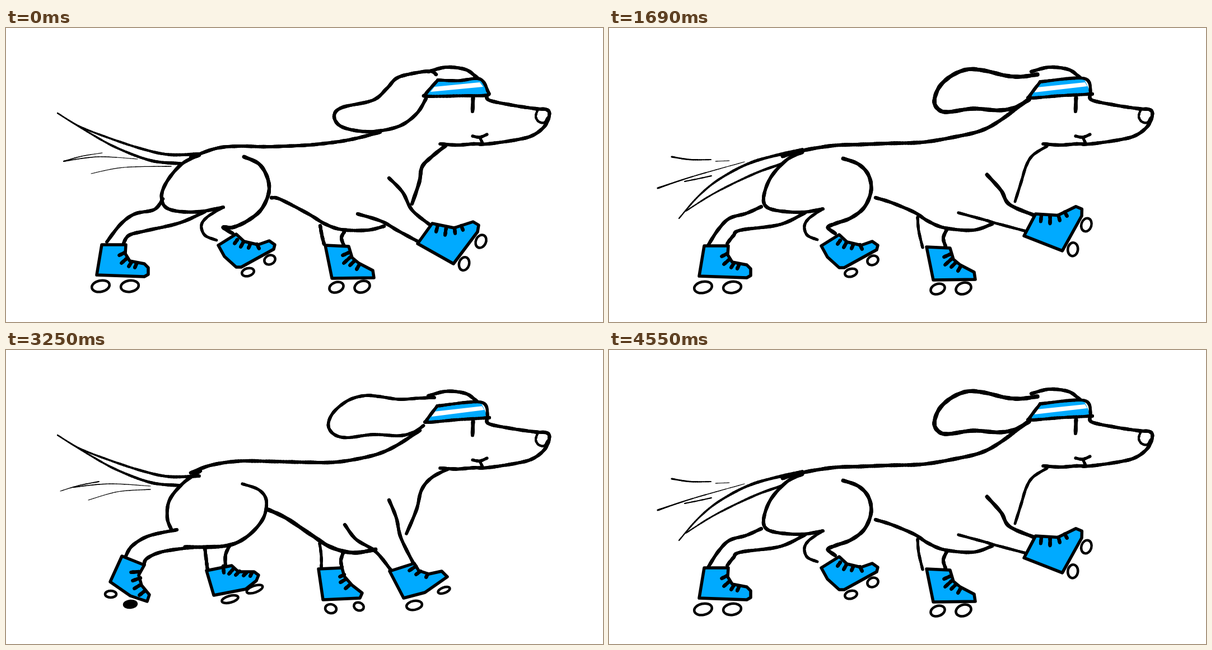
These frames come from a looping animation (1066 px wide and 525 px high, 4680 ms). An HTML page with a canvas:

```html
<!DOCTYPE html>
<html lang="en">
<head>
<meta charset="utf-8">
<title>Skating dachshund</title>
<style>
html, body { margin: 0; width: 100%; height: 100%; overflow: hidden; background: #fff; }
canvas { display: block; }
</style>
</head>
<body>
<canvas id="stage" width="1066" height="525"></canvas>
<script>
const ctx = document.getElementById('stage').getContext('2d');
const BLUE = '#00aaff', STEP = 130, LOOP = 4680, CYCLE = 11;

// Strokes read "width x y x y ..."; a width such as "2-6" swells along the line.
const ears = {
  low: '6 768 83 757 77 722 82 697 90 680 108 655 129 600 142 586 157 597 175 630 184 665 184 705 174 734 152 750 126',
  up: '7 765 83 735 87 708 85 670 76 640 74 612 85 590 105 581 130 588 145 605 150 650 144 695 147 725 142 750 128',
  flat: '4 765 87 740 85 695 91 662 90 640 89 610 95 580 117 570 137 582 155 612 163 660 158 710 159 732 151 741 142',
  mid: '5.5 768 86 745 86 720 90 690 100 660 112 610 116 588 125 577 145 586 162 610 171 650 174 688 173 718 161 755 125'
};

const backs = {
  low: '6 330 231 375 215 415 211 460 212 500 211 540 209 570 206 600 202 630 196 668 186',
  up: '6.5 310 229 345 219 400 210 450 208 500 206 560 204 620 194 665 183 700 164 748 128',
  flat: '6 350 210 385 193 430 187 500 190 570 195 610 197 640 194 670 186 700 174 730 159',
  flat2: '6 355 207 385 196 430 189 480 190 520 191 600 188 660 182 685 173 703 165 722 156',
  mid: '6.5 330 220 360 210 420 203 470 200 520 200 575 201 605 198 630 193 660 184 690 173'
};

const tails = {
  up: ['2-6 92 152 130 175 180 195 240 215 290 226 345 225', '2-6 92 152 150 188 200 215 260 237 312 242'],
  mid: ['4-6 79 235 120 241 200 238 260 233 300 225 352 208', '4-6 79 235 130 247 185 249 240 249 316 237'],
  down: ['2-6 125 340 160 300 200 268 260 238 345 217', '2-5 137 327 190 294 260 260 310 242']
};

const winds = {
  up: ['2-1 103 238 135 229 172 223', '2-1 103 238 165 230 235 234', '1-1.5 152 260 210 249 295 247'],
  up2: ['1-2 97 252 130 242 166 235', '2-1 120 245 185 239 258 243', '1-1.5 147 268 200 253 258 249'],
  mid: ['2-1 179 176 205 188 236 199', '2-.5 109 191 150 205 225 215', '2-1 125 200 200 217 290 223'],
  mid2: ['3-1 98 189 130 203 167 214', '2-1 98 189 180 208 275 223', '1-1.5 150 176 200 198 268 210'],
  down: ['3-2 112 230 145 235 182 235', '1 190 238 215 237', '3-1 87 286 150 265 242 239', '2 135 274 160 269 183 264'],
  down2: ['1.5 107 236 160 238 220 234', '1-2 132 266 190 256 250 240', '1.5 92 268 140 266 187 263']
};

const bands = {
  level: ['771 93 808 94 846 91 860 112 858 120 815 121 752 122 750 117', '765 105 846 97 852 105 758 114'],
  slant: ['770 96 848 90 860 115 858 118 805 121 753 125 752 120', '764 106 850 97 854 104 760 115']
};

const face = [
  '6 754 78 786 70 820 74 838 86 846 93',
  '6 859 119 863 129 905 138 945 144 966 146 970 156 962 175 942 191 915 199 860 207 835 207 805 209 775 207',
  '4 949 147 946 158 951 167 961 169 967 160',
  '6.5 834 124 833 149',
  '5 833 193 846 195 859 190',
  '5 846 195 851 206'
];

// Each skate: outline; laces; wheels as x y rx ry tilt (a sixth value fills the wheel).
const skates = {
  P: ['171 387 214 387 213 403 221 416 247 421 254 428 254 440 247 444 162 441',
    ['212 401 202 406', '215 412 206 420', '224 418 219 426', '233 421 230 428'], ['169 461 16 10 -12', '221 461 16 10 -8']],
  R: ['379 388 411 368 425 381 450 387 470 380 480 387 478 395 420 427 411 427 390 408',
    ['413 378 408 385', '424 382 419 391', '436 386 433 393', '448 386 452 394'], ['432 436 11 7 -15', '471 414 10 8 -25']],
  F: ['570 388 612 390 618 410 630 420 655 433 657 446 582 447',
    ['612 401 601 406', '615 409 603 420', '622 416 614 424', '630 424 626 431'], ['590 463 13 9 -20', '636 462 14 10 -20']],
  U: ['761 349 800 357 834 346 844 352 842 364 799 421 735 385',
    ['771 352 768 364', '786 357 784 370', '801 357 802 367', '813 353 816 361'], ['818 421 9 12 15', '848 381 9 12 25']],
  S: ['180 387 232 387 232 403 240 414 256 421 259 433 257 445 170 445',
    ['230 399 217 403', '232 408 216 412', '238 414 227 422', '243 418 240 426'], ['185 459 16 9 -8', '239 459 16 8 -8']],
  T: ['323 385 365 381 373 391 408 393 412 402 406 420 320 431 317 425',
    ['365 382 350 390', '372 391 367 399', '382 394 379 401', '392 395 392 402'], ['330 440 12 4 -8', '380 437 9 4 -5 1']],
  G: ['589 395 641 394 648 413 665 426 684 440 684 447 608 450 598 430',
    ['642 405 630 410', '646 414 636 422', '656 424 649 431', '667 430 662 437'], ['618 466 10 10 0', '668 466 12 11 0']],
  V: ['665 399 709 385 717 398 735 404 758 399 768 409 728 437 690 447',
    ['712 390 700 398', '720 399 712 405', '733 404 730 410'], ['709 460 14 8 -10', '762 433 11 5 -20']],
  K: ['250 368 290 384 280 402 285 420 299 437 295 449 265 439 229 414',
    ['280 396 266 397', '283 407 269 412', '282 420 272 426', '291 430 281 438'], ['230 436 10 6 0', '265 454 11 6 -5 1']],
  Q: ['315 400 360 391 372 402 400 402 408 408 404 418 385 433 328 444',
    ['345 392 346 404', '362 398 355 406', '374 401 367 408', '386 404 381 409', '396 404 393 410'], ['357 451 15 6 -15', '401 433 15 6 -20']],
  N: ['582 396 620 394 631 402 634 420 662 434 666 442 660 450 587 452',
    ['630 405 616 409', '633 414 621 420', '640 422 632 430', '652 429 647 437'], ['602 466 9 8 10', '652 463 9 8 10']],
  M: ['622 388 645 392 634 410 610 430 582 424 580 402', [], ['572 439 10 8 10']],
  D: ['558 391 600 389 604 404 618 420 636 434 632 443 566 446',
    ['604 401 596 405', '607 409 597 415', '613 420 606 426'], ['580 462 10 8 10', '630 458 9 7 20']],
  E: ['638 376 678 400 664 414 668 432 680 445 678 459 655 456 610 425',
    ['662 408 650 410', '664 418 652 422', '667 430 656 436', '674 437 667 444'], ['607 440 9 6 10', '648 464 12 6 5']]
};

// Leg poses: body and leg lines, then skates as "name dx dy turn", far ones first.
const nearOut = {
  lines: ['6 345 227 315 242 290 270 278 297 283 318 305 327 345 328 388 320',
    '6.5 425 230 452 243 467 268 469 295 455 325 430 345 405 356 388 356 405 367',
    '5 386 321 360 337 349 352 355 370 376 379', '6 280 305 265 324 230 332 205 350 180 382',
    '6 355 328 310 348 250 362 220 370 210 384', '6 474 303 490 306 540 332 570 350 600 360 645 361 675 354',
    '6.5 785 210 760 230 743 248 738 275 725 314', '6 684 268 708 293 725 325 755 350',
    '6 628 332 670 345 700 362 737 382', '6 561 353 564 370 568 386', '6 604 364 599 375 604 390'],
  skates: ['P 0 0 0', 'F 0 0 0', 'R 0 0 0', 'U 0 0 0']
};
const nearHigh = {
  lines: ['6 345 222 318 235 290 265 277 297 279 317 300 326 345 329 382 323',
    '6.5 418 233 445 243 463 262 468 290 456 320 432 339 405 349 391 356 404 367',
    '5 380 324 357 340 349 354 354 370 372 378', '6 272 319 245 331 215 340 195 360 177 388',
    '6 350 330 305 351 235 361 222 371 211 385', '6 476 303 505 312 545 329 570 345 600 357 650 361 684 350',
    '5 782 211 757 227 745 246 736 275 725 310', '6.5 675 262 700 290 715 315 758 334',
    '5 624 330 672 343 685 347 745 363', '5 551 338 553 362 560 392', '6 603 360 597 375 601 390'],
  skates: ['P -1 2 0', 'F -3 3 0', 'R 0 1 0', 'U 3 -23 -8']
};

const farBody = ['6.5 345 228 305 248 285 280 281 325', '6 287 327 245 333 222 350 203 384',
  '3-7 444 264 425 287 395 318 360 340 320 356 260 370 235 384', '6 420 293 460 298 500 311 545 338 580 358 596 360',
  '6 445 298 425 330 400 346 366 355 382 364', '6 326 355 332 369 355 377',
  '7 785 210 760 230 743 248 738 290 720 325 690 350 640 361', '6 598 280 590 305 595 335 598 360 604 390',
  '6 684 278 670 310 648 338 636 356 634 372 638 388'];
const farOut = {
  lines: [...farBody, '6 710 333 722 342 737 347', '6 675 357 695 369 715 378'],
  skates: ['R -24 -1 0', 'U -21 -6 0', 'P 24 1 0', 'F 33 1 0']
};
const farHigh = {
  lines: [...farBody, '6 712 322 722 328 740 332', '6 675 353 695 358 722 365'],
  skates: ['R -24 2 0', 'U -18 -29 -8', 'P 23 3 0', 'F 30 4 0']
};

const hipFlat = '6 352 209 318 237 301 265 301 295 316 320';
const hindFlat = [hipFlat, '5 332 320 290 328 265 342 258 367', '6 300 351 288 358 284 380', '5 316 355 317 398'];
const nearDown = {
  lines: [...hindFlat, '4-7 425 246 450 254 461 270 450 300 420 330 380 346 300 352', '7 375 350 350 364 345 400',
    '8 458 267 480 273 530 316 587 357', '4-5 602 283 592 310 589 350 588 392',
    '3-6 694 268 685 295 660 330 634 360 618 392', '6.5 800 214 770 222 745 243 727 270 722 300 710 328 680 347 635 360',
    '6 669 357 662 378 640 394'],
  skates: ['K 0 0 0', 'M 0 0 0', 'Q 0 0 0', 'N 0 0 0']
};
const farDown = {
  lines: [...hindFlat, '4-7 444 252 443 275 425 305 390 335 350 357', '6 350 353 325 355 300 351', '6 350 357 346 380 346 400',
    '7 442 278 490 289 530 322 570 350 605 366 640 368 668 352', '6 795 215 760 230 742 252 730 290 718 325 706 337',
    '5-7 600 291 615 318 640 342 670 350', '4-6 682 269 700 300 706 340 700 375 680 393',
    '4 567 356 565 388', '6 606 361 597 388'],
  skates: ['K 0 0 0', 'Q 0 0 0', 'D 0 0 0', 'E 0 0 0']
};
const farSwing = {
  lines: ['6.5 345 216 315 238 290 270 275 300 272 325', '6 272 321 235 338 205 360 188 382',
    '7 435 265 405 295 370 327 320 345 260 362 222 382', '7 412 283 460 291 510 303 550 328 588 350',
    '6 443 295 420 322 395 337 355 347', '7 355 347 372 370', '6 308 350 310 366 338 379',
    '6 598 288 588 315 592 350 597 392', '5-6 685 283 680 310 660 340 634 357 631 390',
    '6.5 787 212 755 235 740 262 728 302 712 333 680 352 640 360', '6 650 365 668 392', '7 684 348 697 382'],
  skates: ['T 0 0 0', 'V 0 0 0', 'S 0 0 0', 'G 0 0 0']
};

const hindKick = ['6 347 216 316 238 292 268 288 300 296 322', '6 305 321 255 332 225 350 213 370', '6 335 352 280 360 252 372 246 384'];
const nearFall = {
  lines: [...hindKick, '5-7 422 239 452 250 465 270 458 303 428 335 390 350 320 352', '6 355 353 358 378 360 392',
    '6 400 348 392 366 392 388', '7 468 285 500 300 545 330 580 352 620 362 660 356',
    '6 790 212 760 228 742 250 733 285 715 328', '6 684 268 697 300 705 335 727 380', '6 605 312 625 338 660 360 688 394',
    '5 560 345 563 368 563 388', '6 602 362 598 376 600 389'],
  skates: ['K -43 0 0', 'D 0 0 0', 'Q 43 -6 0', 'V 20 -4 0']
};
const farFall = {
  lines: [...hindKick, '4-7 440 258 434 285 405 318 365 343 320 353', '6 355 345 356 372 352 394', '6 395 328 390 360 387 388',
    '7 430 283 470 290 510 308 550 335 588 357', '5 598 285 590 310 588 350 588 392',
    '4-6 690 272 678 305 650 340 632 362 622 392', '6 790 212 760 228 738 255 730 295 712 330 680 350 635 361',
    '6 655 362 672 392', '6 690 346 712 380'],
  skates: ['V 3 -3 0', 'Q 38 -5 0', 'K -40 0 0', 'N 0 1 0']
};

// Halfway between two stroke strings with equal structure.
function mix(a, b) {
  const q = b.split(' ');
  return a.split(' ').map((v, i) => isNaN(v) ? v : (+v + +q[i]) / 2).join(' ');
}
function mixPose(a, b) {
  const both = key => a[key].map((s, i) => mix(s, b[key][i]));
  return { lines: both('lines'), skates: both('skates') };
}

const earRise = mix(ears.low, ears.up), earDrop = mix(ears.up, ears.flat);
const backRise = mix(backs.low, backs.up), backDrop = mix(backs.up, backs.flat);

// pose, head drop, ear, back, tail, wind
const cycle = [
  [nearOut, 0, ears.low, backs.low, 'up', 'up'],
  [mixPose(nearOut, nearHigh), -3, earRise, backRise, 'mid', 'mid2'],
  [nearHigh, 0, ears.up, backs.up, 'down', 'down'],
  [nearFall, 4, earDrop, backDrop, 'up', 'up2'],
  [nearDown, 7.5, ears.flat, backs.flat, 'mid', 'mid'],
  [farSwing, 4, ears.mid, backs.mid, 'down', 'down2'],
  [farOut, 0, ears.low, backs.low, 'up', 'up2'],
  [mixPose(farOut, farHigh), -3, earRise, backRise, 'mid', 'mid'],
  [farHigh, 0, ears.up, backs.up, 'down', 'down2'],
  [farFall, 4, earDrop, backDrop, 'up', 'up'],
  [farDown, 6, ears.flat, backs.flat2, 'mid', 'mid2']
];

function points(nums, drop = 0) {
  const pts = [];
  for (let i = 0; i < nums.length; i += 2) {
    const x = +nums[i];
    pts.push([x, +nums[i + 1] + drop * (1 - (x - 760) / 420)]);
  }
  return pts;
}

function spline(a, b, c, d, t) {
  return [0, 1].map(k => b[k] + t / 2 * (c[k] - a[k] +
    t * (2 * a[k] - 5 * b[k] + 4 * c[k] - d[k] + t * (3 * (b[k] - c[k]) + d[k] - a[k]))));
}

function brush(text, drop) {
  const [width, ...nums] = text.split(' ');
  const [w0, w1 = w0] = width.split('-').map(Number);
  const p = points(nums, drop), last = p.length - 1, n = 12;
  let from = p[0];
  for (let i = 0; i < last; i++) {
    for (let j = 1; j <= n; j++) {
      const to = spline(p[Math.max(i - 1, 0)], p[i], p[i + 1], p[Math.min(i + 2, last)], j / n);
      const wobble = 1 + .07 * Math.sin((i * n + j) * .9);
      ctx.lineWidth = (w0 + (w1 - w0) * (i + j / n) / last) * wobble;
      ctx.beginPath();
      ctx.moveTo(...from);
      ctx.lineTo(...to);
      ctx.stroke();
      from = to;
    }
  }
}

function shape(text, fill, line, drop) {
  ctx.beginPath();
  points(text.split(' '), drop).forEach(p => ctx.lineTo(...p));
  ctx.closePath();
  ctx.fillStyle = fill;
  ctx.fill();
  if (line) {
    ctx.lineWidth = line;
    ctx.stroke();
  }
}

function skate(text) {
  const [name, dx, dy, turn] = text.split(' ');
  const [outline, laces, wheels] = skates[name];
  const p = points(outline.split(' '));
  const [cx, cy] = [0, 1].map(k => p.reduce((sum, q) => sum + q[k], 0) / p.length);
  ctx.save();
  ctx.translate(cx + +dx, cy + +dy);
  ctx.rotate(turn * Math.PI / 180);
  ctx.translate(-cx, -cy);
  shape(outline, BLUE, 5.5);
  laces.forEach(l => brush('6 ' + l));
  for (const wheel of wheels) {
    const [x, y, rx, ry, tilt, solid] = wheel.split(' ').map(Number);
    ctx.beginPath();
    ctx.ellipse(x, y, rx, ry, tilt * Math.PI / 180, 0, 7);
    ctx.fillStyle = solid ? '#000' : '#fff';
    ctx.fill();
    ctx.lineWidth = 4.5;
    ctx.stroke();
  }
  ctx.restore();
}

function draw(phase) {
  const [pose, drop, ear, back, tail, wind] = cycle[phase];
  ctx.fillStyle = '#fff';
  ctx.fillRect(0, 0, 1066, 525);
  ctx.strokeStyle = '#000';
  ctx.lineCap = ctx.lineJoin = 'round';
  [...winds[wind], ...tails[tail], back, ...pose.lines].forEach(s => brush(s));
  pose.skates.forEach(skate);
  face.forEach(s => brush(s, drop));
  brush(ear);
  const [band, stripe] = bands[phase % 6 ? 'slant' : 'level'];
  shape(band, BLUE, 0, drop);
  shape(stripe, '#fff', 0, drop);
  const edge = band.split(' ');
  brush('5.5 ' + [...edge, edge[0], edge[1]].join(' '), drop);
}

let shown = -1;
function tick() {
  const phase = Math.floor(performance.now() % LOOP / STEP) % CYCLE;
  if (phase !== shown) draw(shown = phase);
  requestAnimationFrame(tick);
}
tick();
</script>
</body>
</html>
```
